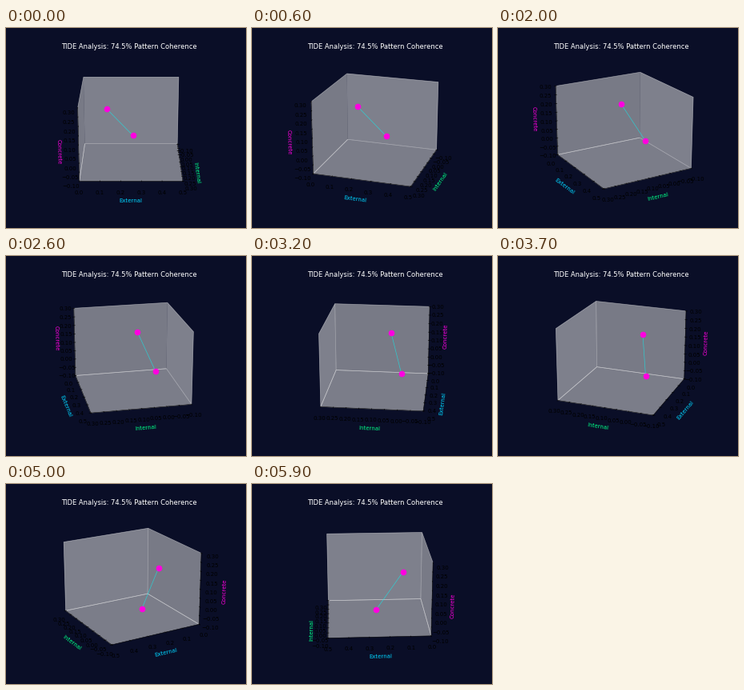
A matplotlib script for the animation above (6 s loop, 300 by 250 pixels).

```python
import matplotlib.pyplot as plt
from matplotlib.animation import FuncAnimation

FRAMES = 60
INTERVAL = 100
BG = "#0a0e27"
CYAN, GREEN, MAGENTA = "#00d4ff", "#00ff88", "#ff00e0"

# Internal, External, Concrete coordinates of the two states
start = (0.052, 0.125, 0.182)
end = (0.0, 0.26, 0.0)
xs, ys, zs = zip(start, end)

fig = plt.figure(figsize=(6, 5), dpi=50, facecolor=BG)
ax = fig.add_subplot(projection="3d", facecolor=BG)

ax.plot(xs, ys, zs, color="#00ffff", alpha=0.6, linewidth=1)
ax.scatter(xs, ys, zs, color=MAGENTA, s=100, depthshade=False)

ax.set_xlim(-0.1, 0.3)
ax.set_ylim(0, 0.5)
ax.set_zlim(-0.1, 0.3)
ax.set_xlabel("Internal", color=GREEN)
ax.set_ylabel("External", color=CYAN)
ax.set_zlabel("Concrete", color=MAGENTA)
ax.set_title("TIDE Analysis: 74.5% Pattern Coherence", color="white")
ax.grid(False)


def update(i):
    """Orbit half a turn around the vertical axis."""
    ax.view_init(elev=20, azim=i * 180 / FRAMES)
    return ()


anim = FuncAnimation(fig, update, frames=FRAMES, interval=INTERVAL,
                     repeat=True, repeat_delay=0)
plt.show()
```
